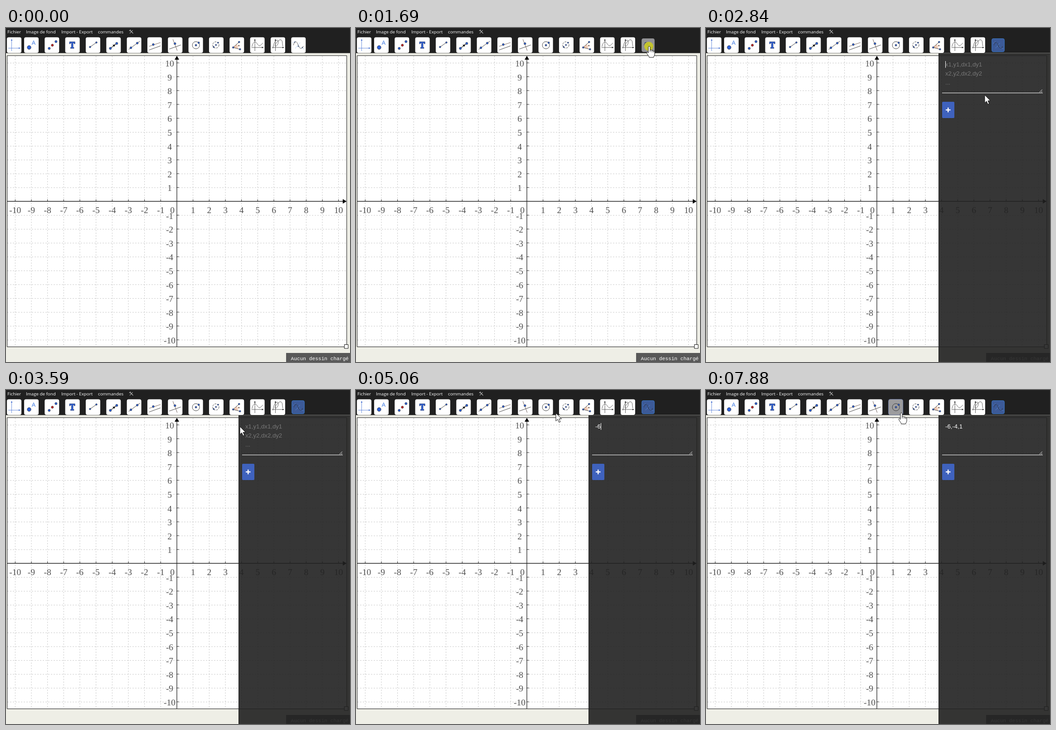
Recreate the animation shown at these times as an HTML page with a canvas. Size 759 by 738 pixels, loop 8 s.

```html
<!DOCTYPE html>
<html lang="fr">
<head>
<meta charset="utf-8">
<title>Dessin</title>
<style>
html, body { margin: 0; width: 100%; height: 100%; overflow: hidden; background: #eeeee6; }
canvas { display: block; }
</style>
</head>
<body>
<canvas id="stage" width="759" height="738"></canvas>
<script>
const ctx = document.getElementById('stage').getContext('2d');
const LOOP = 8000;
const BLUE = '#2f62d9', RED = '#c62828', INK = '#333';
const SANS = '"Liberation Sans", Arial, sans-serif';

function rect(x, y, w, h, fill, stroke, r = 0) {
  ctx.beginPath();
  ctx.roundRect(x, y, w, h, r);
  if (fill) { ctx.fillStyle = fill; ctx.fill(); }
  if (stroke) { ctx.strokeStyle = stroke; ctx.lineWidth = 1; ctx.stroke(); }
}
function line(d, color = INK, width = 0.9, dash = []) {
  ctx.strokeStyle = color;
  ctx.lineWidth = width;
  ctx.setLineDash(dash);
  ctx.stroke(new Path2D(d));
  ctx.setLineDash([]);
}
function fill(d, color = INK) {
  ctx.fillStyle = color;
  ctx.fill(new Path2D(d));
}
function dot(x, y, r = 2.2, color = BLUE) {
  ctx.beginPath();
  ctx.arc(x, y, r, 0, 7);
  ctx.fillStyle = color;
  ctx.fill();
  ctx.strokeStyle = '#222';
  ctx.lineWidth = 0.7;
  ctx.stroke();
}
function text(s, x, y, font, color, align = 'left') {
  ctx.font = font;
  ctx.fillStyle = color;
  ctx.textAlign = align;
  ctx.fillText(s, x, y);
}
function axes(color, y) {
  line(`M10.5 31V6M3 ${y}H27`, color, 0.8);
  fill(`M10.5 4l1.8 4h-3.6zM30 ${y}l-4 1.8v-3.6z`, color);
}

// Toolbar icons, drawn in a 32 x 35 box
const icons = [
  () => axes('#4a74d4', 24.5),
  () => { dot(11, 23, 4.2); text('A', 21, 17, '12.5px ' + SANS, '#2f6fe0', 'center'); },
  () => { dot(10, 25, 2.5); dot(17, 18, 2.5, RED); dot(25, 10, 2.5); },
  () => {
    const d = 'M9.5 10.5H21.5V15H20L19 12.8H17.3V22.7L19.3 23.2V25H11.7V23.2L13.7 22.7V12.8H12L11 15H9.5Z';
    fill(d, BLUE);
    line(d, '#1b2f66', 0.8);
  },
  () => { line('M9.5 22L23.5 12'); dot(9.5, 22, 1.8); dot(23.5, 12, 1.8); },
  () => {
    line('M9 25L23 14', INK, 1.2);
    fill('M20 16.4l-2.6 5.4-3.6-4.6z', '#111');
    dot(9, 25, 2.5); dot(23, 14, 2.5);
  },
  () => { line('M4 27.5L29 9'); dot(9, 23.7); dot(23, 13.4); },
  () => { line('M4 20.5L29 12', '#6e5a50'); line('M4 28.5L29 19.5'); dot(13, 16.5); },
  () => { line('M3 26.5L28.5 17.5'); line('M11 5L20.5 30', '#5c4a44'); dot(15.5, 14.5); },
  () => {
    line('M24.5 18a8 8 0 1 1-16 0a8 8 0 1 1 16 0');
    dot(16.5, 18, 1.9); dot(22.5, 12.5, 1.9);
  },
  () => {
    line('M22 17.5a7 7 0 1 1-14 0a7 7 0 1 1 14 0', INK, 0.9, [4, 2]);
    dot(15.3, 17.5, 1.4); dot(20, 12.5, 1.4); dot(10.3, 22, 1.4);
  },
  () => {
    fill('M8 23L16 15.5Q19 19 18.5 25.5Z', '#f3cdb8');
    line('M21 11L8 23L23 27');
    dot(8, 23, 1.8); dot(21, 11, 1.8); dot(23, 27, 1.8);
    dot(20.5, 19, 1.1, '#e07030');
  },
  () => { axes(INK, 23); line('M4 21C7 10 11 8 15 14S21 22 28 13', INK, 0.8); },
  () => {
    axes(INK, 23);
    line('M5 25C7 12 11 6 15 7S16 20 11 20S17 5 22 6S25 14 27 20', INK, 0.8);
  },
  () => {
    line('M3 13L10 8M13 21H19M22 23L29 27M9 25L20 12', '#7aa9ea', 0.7, [3, 1.5]);
    line('M5 18C8 6 12 9 15 17S22 29 27 20', INK, 0.8);
    dot(8, 11.5, 0.8); dot(16, 20, 0.8); dot(25, 23, 0.8);
  }
];
const last = icons.length - 1;
const buttonX = i => i < 2 ? 2 + 38 * i : 85.3 + 45.33 * (i - 2);

function drawBoard() {
  rect(0, 0, 759, 738, '#eeeee6');
  rect(2.5, 61, 749.3, 643.5, '#fff', '#111');
  const gx = n => 377 + 35.67 * n, gy = n => 383 - 30.6 * n;
  const label = '19.5px "Liberation Serif", "Times New Roman", serif';
  for (let n = -10; n <= 10; n++) {
    if (n) line(`M${gx(n)} 62V704M3 ${gy(n) + 0.4}H751`, '#c8c8c8', 1, [3, 3]);
  }
  for (let n = -10; n <= 10; n++) {
    text(n, n ? gx(n) : 367, 409, label, '#505050', 'center');
    if (!n) continue;
    text(n, 361, gy(n) + 8, label, '#505050', 'center');
    line(`M${gx(n)} 378.5V383M377 ${gy(n)}H381.5`, '#222', 1);
  }
  line('M377 68V704M3 383H745', '#222', 1.3);
  fill('M377 61.5l5 8.5h-10zM751.5 383l-8.5 5v-10z', '#000');
  rect(746.5, 699.5, 8.5, 8.5, '#fff', '#111');
  rect(618, 718, 141, 20, '#585858');
  text('Aucun dessin chargé', 628.5, 734, '11.2px "Liberation Mono", "Courier New", monospace', '#fff');
}

function drawToolbar(t, hovered) {
  rect(0, 0, 759, 55.5, '#202020');
  const menu = [['Fichier', 3], ['Image de fond', 44], ['Import - Export', 122], ['commandes', 203]];
  for (const [s, x] of menu) text(s, x, 12, '9.75px "Open Sans", "Noto Sans", sans-serif', '#fff');
  line('M274 5.5L280.5 12M279.5 5L273 12', '#bbb', 1.1);
  line('M272 6.5L275 4', '#bbb', 1.5);

  icons.forEach((icon, i) => {
    const x = buttonX(i), on = i === hovered;
    const opened = i === last && t >= 1690;
    if (opened) {
      rect(x + 1.5, 23.5, 27.5, 29, on ? '#929295' : '#3c5a98', on ? '#929295' : '#3b7ccb', 3);
    } else {
      rect(x, 20.5, 32, 34.5, on ? '#9c9c9e' : '#fff', on ? '#7280a8' : null, 4);
    }
    ctx.save();
    ctx.translate(x, 20);
    if (opened) {
      ctx.translate(1.8, 2.5);
      ctx.scale(0.88, 0.88);
    }
    icon();
    ctx.restore();
  });
}

// Times at which characters are typed
const typed = [[4600, '-'], [4920, '6'], [5670, ','], [6480, '-'], [6810, '4'], [7080, ','], [7350, '1']];
const FOCUS = 2570, BLINK = 530;

function drawPanel(t) {
  rect(513, 56, 246, 682, 'rgba(33,33,33,.9)');
  line('M513.5 738V56.5H759', '#1c1c1c', 1);
  const font = '13.15px ' + SANS;
  const done = typed.filter(([at]) => t >= at);
  const value = done.map(([, c]) => c).join('');
  if (value) text(value, 528, 85, font, '#fff');
  else ['x1,y1,dx1,dy1', 'x2,y2,dx2,dy2', '...'].forEach((s, i) =>
    text(s, 528, 85 + 20 * i, font, '#777'));
  const since = t - (done.length ? done[done.length - 1][0] : FOCUS);
  if (since >= 0 && Math.floor(since / BLINK) % 2 === 0) {
    ctx.font = font;
    rect(Math.round(528 + ctx.measureText(value).width), 73, 1, 15, '#fff');
  }
  rect(521, 143, 222, 1, '#fff');
  line('M735.5 142L742 136M739 142L742 139.5', '#ddd', 1);
  rect(521, 163, 27, 36, '#3f62bd', null, 2);
  line('M529 181H539.5M534.2 175.8V186.2', '#fff', 2.4);
}

// Pointer path: time, x, y
const path = [
  [790, 750, 134], [1420, 647, 42], [2010, 647, 42], [2430, 603, 79], [2570, 603, 79],
  [2840, 615, 148], [3100, 615, 148], [3870, 474, 52], [4010, 472, 52], [4710, 443, 51],
  [4920, 441, 51], [5060, 441, 51], [5740, 434.5, 52], [5880, 430, 52], [6140, 430, 52],
  [6210, 431, 52], [LOOP, 431, 52]
];
function pointerAt(t) {
  const i = path.findIndex(p => p[0] > t);
  if (i < 1) return null;
  const [t0, x0, y0] = path[i - 1], [t1, x1, y1] = path[i];
  const u = (t - t0) / (t1 - t0), k = u * u * (3 - 2 * u);
  return { x: x0 + (x1 - x0) * k, y: y0 + (y1 - y0) * k };
}

const ARROW = 'M0 0V17.5L4 13.8L7 20.5L9.8 19.3L7 12.8H12.4Z';
const HAND = 'M-2 0.5C-2-2 2-2 2 0.5V7.5C3 6 6 6.3 6 8C7.5 7 9.2 7.6 9.3 9.2' +
  'C11 8.6 12 9.6 12 11V16C12 19 10 20 9.5 23H0C-.5 20-4 17-5.5 13.5C-6.5 11-4 10-2 13Z';

function drawPointer(p, hand, beam) {
  ctx.save();
  ctx.translate(p.x, p.y);
  ctx.lineJoin = 'round';
  if (beam) {
    line('M-3.5-7.5H-1L0-6.5L1-7.5H3.5M0-6.5V7.5M-3.5 8.5H-1L0 7.5L1 8.5H3.5', '#e8e8e8', 1);
  } else {
    const d = hand ? HAND : ARROW;
    fill(d, '#fff');
    line(d, '#111', 1);
    if (hand) line('M2 7V11M6 8V11.5M9.3 9V12', '#111');
  }
  ctx.restore();
}

function draw(t) {
  const p = pointerAt(t);
  const hovered = p && p.y >= 20 && p.y <= 55
    ? icons.findIndex((_, i) => p.x >= buttonX(i) && p.x <= buttonX(i) + 32) : -1;
  const opened = t >= 1750;
  drawBoard();
  drawToolbar(t, hovered);
  if (opened) drawPanel(t);
  if (t >= 1690 && !opened) {
    ctx.beginPath();
    ctx.arc(646, 40.5, 10, 0, 7);
    ctx.fillStyle = 'rgba(208,208,24,.82)';
    ctx.fill();
  }
  if (p) drawPointer(p, hovered >= 0, opened && p.x > 521 && p.x < 743 && p.y > 70 && p.y < 143);
}

const start = performance.now();
function frame() {
  draw((performance.now() - start) % LOOP);
  requestAnimationFrame(frame);
}
frame();
</script>
</body>
</html>
```
